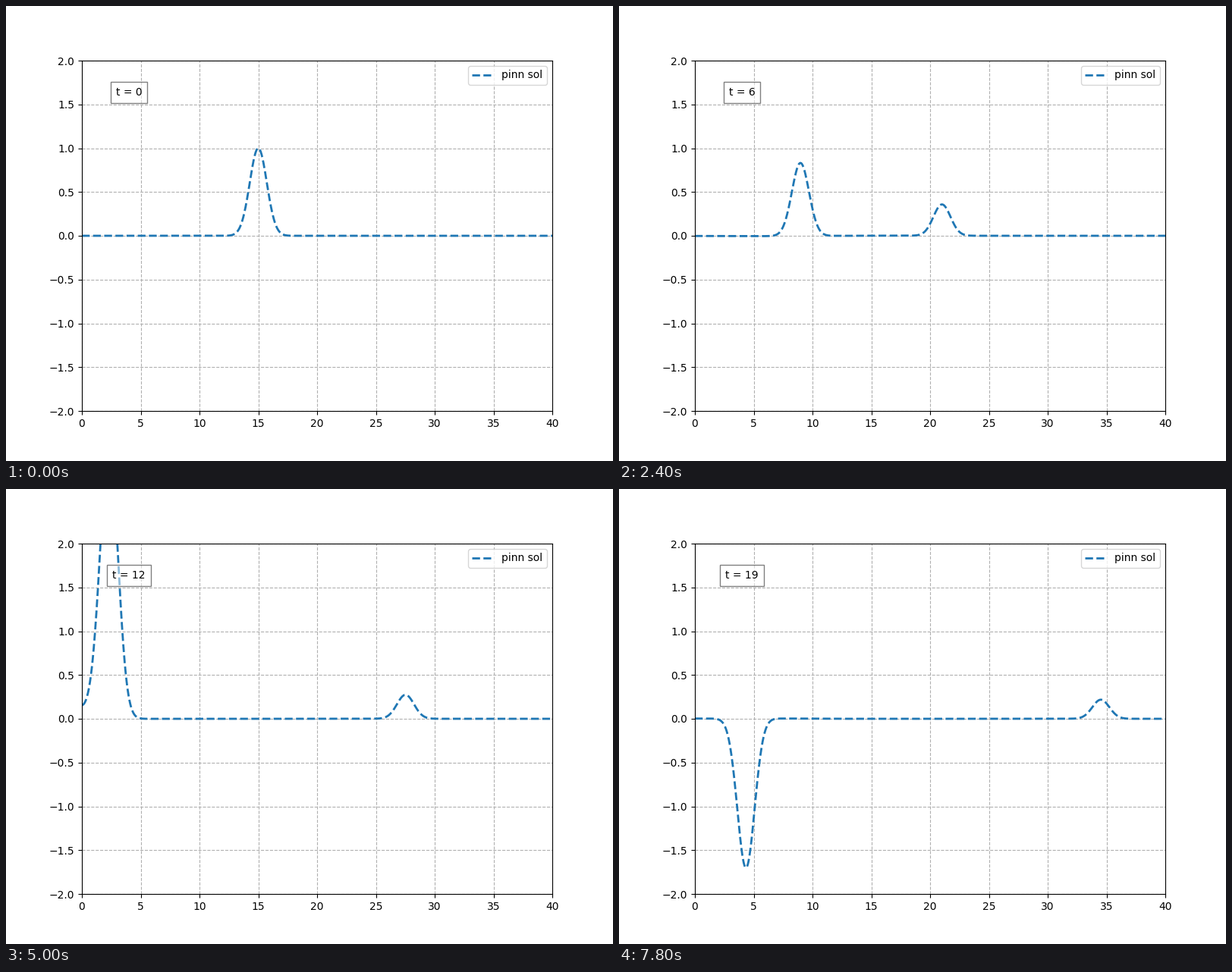
Recreate the animation shown at these times as a matplotlib script. Size 800 by 600 pixels, loop 8000 ms.

```python
import numpy as np
import matplotlib.pyplot as plt
from matplotlib.animation import FuncAnimation

FRAMES = 40
INTERVAL = 200
DT = 0.5
CENTER = 15
SHARPNESS = 0.95

r = np.linspace(1e-4, 40, 1001)


def pulse(s):
    """Odd extension of s * u(s, 0), a Gaussian shell."""
    return s * np.exp(-SHARPNESS * (np.abs(s) - CENTER) ** 2)


def drift(s):
    """Slight dip of the baseline that travels with the wave."""
    return -0.05 * np.exp(-((np.abs(s) - 13) / 4) ** 2)


def wave(t):
    """Spherical wave: inward and outward shells, reflected at r = 0."""
    shells = pulse(r + t) + pulse(r - t)
    return (shells + drift(r + t) - drift(r - t)) / (2 * r)


fig, ax = plt.subplots(figsize=(8, 6), dpi=100)
ax.set_xlim(0, 40)
ax.set_ylim(-2, 2)
ax.grid(linestyle="--")
line, = ax.plot(r, wave(0), "--", color="tab:blue", lw=2, label="pinn sol")
label = ax.text(0.1, 0.9, "t = 0", transform=ax.transAxes, ha="center",
                bbox={"facecolor": "w", "alpha": 0.5, "pad": 5})
ax.legend(loc="upper right")


def update(i):
    t = i * DT
    line.set_ydata(wave(t))
    label.set_text(f"t = {int(t)}")
    return line, label


anim = FuncAnimation(fig, update, frames=FRAMES, interval=INTERVAL,
                     repeat=True, repeat_delay=0)
plt.show()
```
